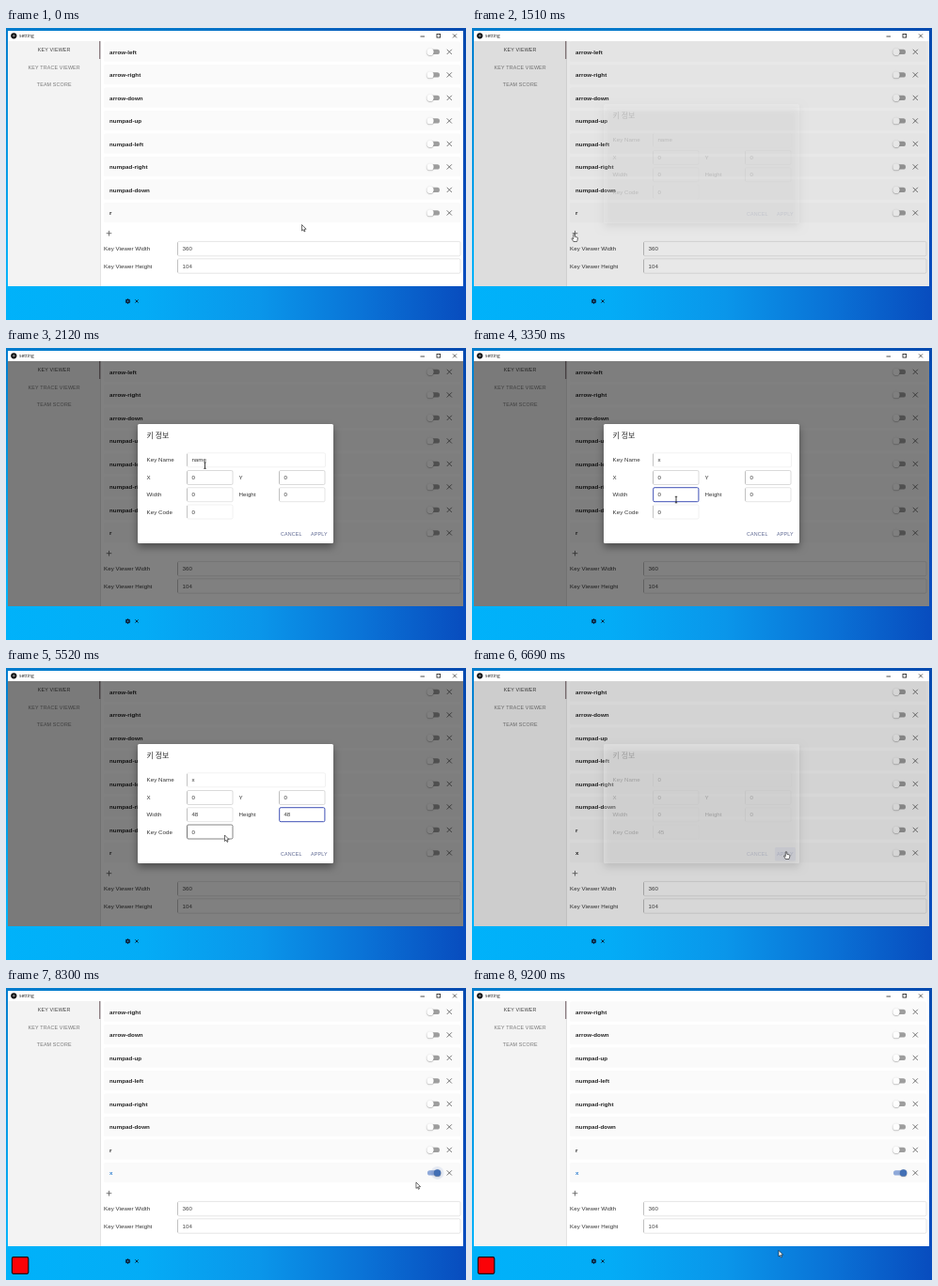
An HTML page with a canvas for the animation above (9250 ms loop, 489x311 px).

```html
<!DOCTYPE html>
<html lang="en">
<head>
<meta charset="utf-8">
<title>Settings window</title>
<style>
html, body { margin: 0; width: 100%; height: 100%; overflow: hidden; background: #0a84e0; }
canvas { display: block; width: 489px; height: 311px; }
</style>
</head>
<body>
<canvas id="stage"></canvas>
<script>
const W = 489, H = 311, LOOP = 9250;
const SANS = '"Liberation Sans", Arial, sans-serif';
const canvas = document.getElementById('stage');
const ctx = canvas.getContext('2d');
const dpr = window.devicePixelRatio || 1;
canvas.width = W * dpr;
canvas.height = H * dpr;

const OPEN = 1460, CLOSE = 6605, SWITCH = 8020, KEY_SHOWN = 8120;
const NAMES = ['arrow-left', 'arrow-right', 'arrow-down', 'numpad-up', 'numpad-left',
  'numpad-right', 'numpad-down', 'r', 'x'];

// time, x, y of the pointer tip
const PATH = [
  [0, 314.5, 209.5], [130, 314.5, 209.5], [260, 312, 208.5], [540, 312, 208.5],
  [800, 240, 203], [1050, 140, 213], [1280, 108.5, 219.5], [1620, 108.5, 219.5],
  [2200, 217, 120], [2900, 217, 120], [3300, 217, 161.5], [3500, 217, 161.5],
  [3630, 218, 162], [5310, 218, 162], [5520, 232.5, 178], [5620, 233, 176],
  [5820, 233, 176], [6000, 198, 175], [6250, 198, 175], [6540, 334, 195.5],
  [6790, 334, 195.5], [7100, 362, 150], [7330, 395.5, 187], [7700, 450, 197],
  [7760, 450, 197], [7840, 451, 197], [8130, 451, 197], [8920, 326, 279.5], [LOOP, 326, 279.5]
];

// time from which each pointer shape applies
const SHAPES = [[0, 'arrow'], [1180, 'hand'], [1720, 'arrow'], [2120, 'beam'], [5420, 'arrow'],
  [5870, 'beam'], [6330, 'arrow'], [6480, 'hand'], [6840, 'arrow'], [7640, 'hand'], [8200, 'arrow']];

// row slot, hover start, hover end
const HOVERS = [[7, 640, 1000], [7, 6800, 6860], [6, 6860, 7010], [5, 7010, 7240],
  [6, 7170, 7350], [7, 7350, 7600]];

const FOCUS = [[0, ''], [2250, 'name'], [3300, 'width'], [4700, 'height'], [5820, 'code'], [CLOSE, '']];
const VALUES = {
  name: [[0, 'name'], [2520, ''], [2700, 'x'], [CLOSE, '0']],
  x: [[0, '0']],
  y: [[0, '0']],
  width: [[0, '0'], [4090, ''], [4520, '48'], [CLOSE, '0']],
  height: [[0, '0'], [4930, '4'], [5060, '48'], [CLOSE, '0']],
  code: [[0, '0'], [6130, '4'], [6230, '45']]
};

// id, label, label x, box x, box width, centre y, strength of the horizontal edges
const FIELDS = [
  ['name', 'Key Name', 149.5, 192, 147.5, 119.3, .25],
  ['x', 'X', 149.5, 192, 49, 138, .7],
  ['y', 'Y', 247.5, 290, 49, 138, .7],
  ['width', 'Width', 149.5, 192, 49, 156.2, .5],
  ['height', 'Height', 247.5, 290, 49, 156.2, .5],
  ['code', 'Key Code', 149.5, 192, 49, 174.5, .25]
];

const clamp = v => Math.max(0, Math.min(1, v));
const smooth = v => v * v * (3 - 2 * v);
const at = (steps, t) => steps.reduce((v, s) => t >= s[0] ? s[1] : v, steps[0][1]);

// cubic-bezier(.4, 0, .2, 1)
function ease(p) {
  p = clamp(p);
  let lo = 0, hi = 1;
  for (let i = 0; i < 20; i++) {
    const u = (lo + hi) / 2, v = 1 - u;
    if (1.2 * u * v * v + .6 * u * u * v + u * u * u < p) lo = u; else hi = u;
  }
  return lo * lo * (3 - 2 * lo);
}

function pointerAt(t) {
  let i = 0;
  while (i < PATH.length - 2 && t >= PATH[i + 1][0]) i++;
  const [t0, x0, y0] = PATH[i], [t1, x1, y1] = PATH[i + 1];
  const p = smooth(clamp((t - t0) / (t1 - t0)));
  return [x0 + (x1 - x0) * p, y0 + (y1 - y0) * p];
}

function rect(x, y, w, h, color) {
  ctx.fillStyle = color;
  ctx.fillRect(x, y, w, h);
}

function round(x, y, w, h, r, fill, stroke, lw) {
  ctx.beginPath();
  ctx.roundRect(x, y, w, h, r);
  if (fill) { ctx.fillStyle = fill; ctx.fill(); }
  if (stroke) { ctx.strokeStyle = stroke; ctx.lineWidth = lw; ctx.stroke(); }
}

function disc(x, y, r, color) {
  ctx.beginPath();
  ctx.arc(x, y, r, 0, 7);
  ctx.fillStyle = color;
  ctx.fill();
}

function lines(color, lw, ...segs) {
  ctx.beginPath();
  for (const [x0, y0, x1, y1] of segs) { ctx.moveTo(x0, y0); ctx.lineTo(x1, y1); }
  ctx.strokeStyle = color;
  ctx.lineWidth = lw;
  ctx.stroke();
}

function cross(x, y, r, color, lw) {
  lines(color, lw, [x - r, y - r, x + r, y + r], [x - r, y + r, x + r, y - r]);
}

function text(str, x, cy, size, color, { weight = 400, align = 'left', gap = .0094, font = SANS } = {}) {
  ctx.font = `${weight} ${size}px ${font}`;
  ctx.letterSpacing = gap * size + 'px';
  ctx.textAlign = align;
  ctx.fillStyle = color;
  ctx.fillText(str, x, cy + size * .35);
}

function drawDesktop() {
  const g = ctx.createLinearGradient(0, 0, W, 0);
  [[0, '#00b2fa'], [.3, '#04acf6'], [.55, '#0a96ea'], [.78, '#0a72d6'], [1, '#084cbe']]
    .forEach(([p, c]) => g.addColorStop(p, c));
  rect(0, 0, W, H, g);
  const v = ctx.createLinearGradient(0, 0, 0, H);
  v.addColorStop(0, 'rgba(0,70,160,.5)');
  v.addColorStop(.85, 'rgba(0,70,160,0)');
  rect(0, 0, W, H, v);
  disc(129.5, 291, 2.3, '#0b1c33');
  for (let i = 0; i < 8; i++) {
    const a = i * Math.PI / 4;
    disc(129.5 + 2.2 * Math.cos(a), 291 + 2.2 * Math.sin(a), .6, '#0b1c33');
  }
  disc(129.5, 291, .8, '#2ba5e8');
  cross(139, 291, 1.6, '#0b1c33', .9);
}

function drawFrame() {
  rect(2, 3, 484, 272, '#fff');
  disc(8.3, 8.3, 3.1, '#111');
  disc(8.3, 8.3, 1.2, '#777');
  text('setting', 14, 8.4, 5, '#222', { font: '"Open Sans", "Noto Sans", sans-serif', gap: 0 });
  lines('#222', .8, [440.5, 9, 445, 9]);
  ctx.strokeRect(458, 6.5, 3.6, 3.6);
  cross(477, 8.4, 2, '#222', .7);

  rect(2, 14, 98, 261, '#f3f3f3');
  rect(100, 14, .8, 261, '#dcdcdc');
  rect(99, 14, 1.3, 19, '#8f8084');
  ['KEY VIEWER', 'KEY TRACE VIEWER', 'TEAM SCORE'].forEach((s, i) =>
    text(s, 51.2, 23.5 + i * 18.3, 5.35, i ? '#777' : '#444', { align: 'center', gap: .0286 }));
}

function hoverAmount(slot, t) {
  let v = 0;
  for (const [s, a, b] of HOVERS)
    if (s === slot) v = Math.max(v, Math.min(clamp((t - a) / 130), 1 - clamp((t - b) / 150)));
  return v;
}

function drawRow(name, slot, t) {
  const c = 25.4 + slot * 24.5;
  const shade = Math.round(250 - 15 * hoverAmount(slot, t));
  round(104, c - 11, 379, 21.4, 1.5, `rgb(${shade},${shade},${shade})`);
  const on = name === 'x' ? ease((t - SWITCH) / 150) : 0;
  text(name, 110, c + .2, 6.2, on > .5 ? '#2f7fd0' : '#222', { weight: 700 });
  round(448, c - 2.6, 13, 5.2, 2.6, on > .5 ? '#8fa9d9' : '#9e9e9e');
  const x = 451 + 7.6 * on;
  if (on > 0 && t < SWITCH + 500)
    disc(x, c, 7, `rgba(63,100,181,${.22 * (1 - clamp((t - SWITCH) / 500))})`);
  ctx.save();
  ctx.shadowColor = 'rgba(0,0,0,.4)';
  ctx.shadowBlur = 1.2 * dpr;
  ctx.shadowOffsetY = .5 * dpr;
  disc(x, c, 3.7, on > .5 ? '#426fb5' : '#fdfdfd');
  ctx.restore();
  cross(471.3, c, 2.6, '#606060', .85);
}

function inputBox(x, y, w, h, edge) {
  const a = ctx.globalAlpha;
  ctx.globalAlpha = a * edge;
  round(x + .5, y, w - .5, h, 1.4, null, '#b4b4b4', .7);
  ctx.globalAlpha = a;
  lines('#b8b8b8', .8, [x + .5, y + 1, x + .5, y + h - 1]);
}

function drawMain(t) {
  const first = t >= CLOSE ? 1 : 0;
  for (let i = 0; i < 8; i++) drawRow(NAMES[first + i], i, t);
  lines('#606060', .85, [106.7, 218.7, 112.3, 218.7], [109.5, 215.9, 109.5, 221.5]);
  [['Key Viewer Width', '360', 235.2], ['Key Viewer Height', '104', 253.6]].forEach(([label, val, y]) => {
    text(label, 104, y, 6.15, '#333');
    inputBox(182, y - 7.8, 301, 15.4, .5);
    text(val, 187.5, y, 6.15, '#444');
  });
}

function drawField([id, label, lx, x, w, cy, edge], t) {
  const h = 15, y = cy - h / 2, focused = at(FOCUS, t) === id;
  const value = at(VALUES[id], t), tx = x + 5.4;
  text(label, lx, cy, 6.15, '#333');
  if (focused) {
    round(x + .7, y, w - .8, h, 1.4, null, '#3f51b5', 1);
  } else {
    inputBox(x, y, w, h, edge);
    if (id === 'code' && t >= 5480 && t < 5820)
      round(x + .5, y, w - .5, h, 1.4, null, '#444', .6);
  }
  const selected = id === 'name' ? t >= 2360 && t < 2520
    : id === 'height' ? t >= 4700 && t < 4930
    : id === 'code' && t >= 5960 && t < 6130;
  if (selected) rect(tx - .3, cy - 3.5, value.length * 3.5 + .5, 7, '#2f6fd0');
  text(value, tx, cy, 6.15, selected ? '#fff' : '#333');
  if (id === 'width' && t >= 3870 && t < 4370) rect(197, cy - 3, .6, 6, '#333');
}

function drawDialog(t) {
  const shown = t < CLOSE ? ease((t - OPEN) / 225) : 1 - ease((t - CLOSE) / 195);
  if (t < OPEN || shown <= 0) return;
  rect(2, 14, 484, 261, `rgba(0,0,0,${.5 * shown})`);
  ctx.save();
  ctx.globalAlpha = shown;
  ctx.save();
  ctx.shadowColor = 'rgba(0,0,0,.4)';
  ctx.shadowBlur = 9 * dpr;
  ctx.shadowOffsetY = 4 * dpr;
  round(140, 81, 208, 127, 1.5, '#fff');
  ctx.restore();
  text('키 정보', 149.5, 93, 8, '#333', { font: '"Noto Sans CJK KR", "Noto Sans CJK", sans-serif', gap: 0 });
  FIELDS.forEach(f => drawField(f, t));
  const hover = clamp((t - 6470) / 120);
  if (hover) round(322, 191, 22, 14.5, 1.5, `rgba(63,81,181,${.2 * hover})`);
  const caps = { gap: .0286 };
  text('CANCEL', 292, 198.4, 5.35, '#5c6690', caps);
  text('APPLY', 324, 198.4, 5.35, '#5c6690', caps);
  ctx.restore();
}

const POINTERS = {
  arrow() {
    ctx.beginPath();
    [[0, 0], [0, 6.5], [1.5, 5.2], [2.5, 7.4], [3.5, 7], [2.5, 4.8], [4.6, 4.7]]
      .forEach(([x, y]) => ctx.lineTo(x, y));
    ctx.closePath();
    ctx.fillStyle = '#fff';
    ctx.fill();
    ctx.strokeStyle = '#111';
    ctx.lineWidth = .6;
    ctx.stroke();
  },
  beam() {
    lines('#111', .8, [0, -3, 0, 3.2], [-1.2, -3.2, 1.2, -3.2], [-1.2, 3.3, 1.2, 3.3]);
  },
  hand() {
    ctx.beginPath();
    [[-.7, .4], [0, -.2], [.7, .4], [.8, 2.8], [3.6, 3.5], [4, 4.3], [3.4, 7], [3, 8], [-.6, 8], [-2.4, 5], [-2.1, 4.3], [-.7, 5.2]]
      .forEach(([x, y]) => ctx.lineTo(x, y));
    ctx.closePath();
    ctx.fillStyle = '#fff';
    ctx.fill();
    ctx.strokeStyle = '#111';
    ctx.lineWidth = .6;
    ctx.stroke();
  }
};

function drawPointer(t) {
  const [x, y] = pointerAt(t);
  ctx.save();
  ctx.translate(x, y);
  POINTERS[at(SHAPES, t)]();
  ctx.restore();
}

function draw(t) {
  ctx.setTransform(dpr, 0, 0, dpr, 0, 0);
  drawDesktop();
  if (t >= KEY_SHOWN) round(6.4, 286.6, 17.4, 17.8, 1.6, '#fb0207', '#1a0508', 1.1);
  drawFrame();
  drawMain(t);
  drawDialog(t);
  drawPointer(t);
}

const start = performance.now();
function tick() {
  draw((performance.now() - start) % LOOP);
  requestAnimationFrame(tick);
}
tick();
</script>
</body>
</html>
```
